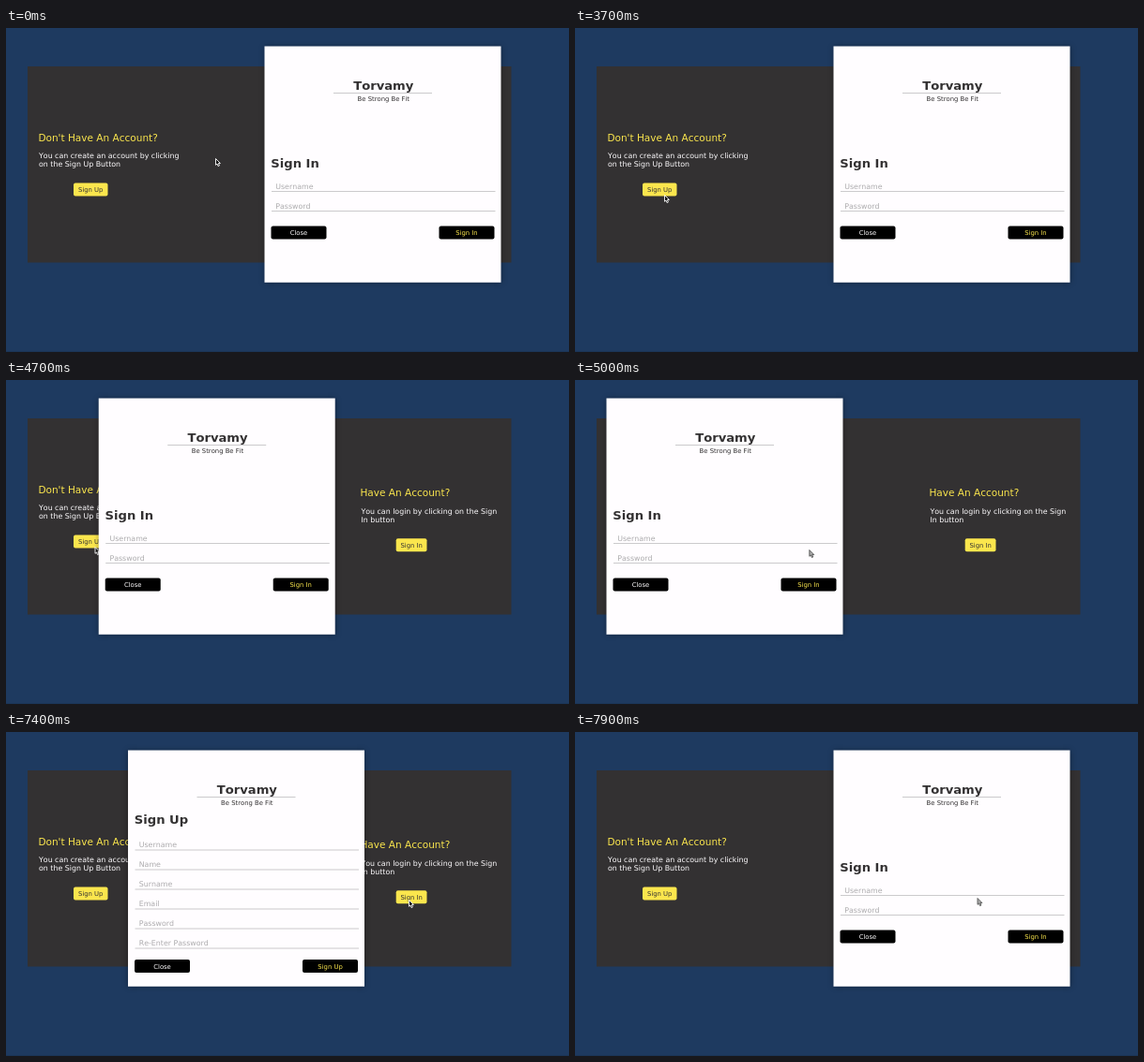
An HTML page with a canvas that plays this animation: 600 by 346 pixels, repeating every 8 s.

```html
<!DOCTYPE html>
<html lang="en">
<head>
<meta charset="utf-8">
<title>Sign in and sign up</title>
<style>
  html, body { margin: 0; width: 600px; height: 346px; overflow: hidden; background: #1e3a60; }
  canvas { display: block; }
</style>
</head>
<body>
<canvas id="stage" width="600" height="346"></canvas>
<script>
const ctx = document.getElementById('stage').getContext('2d');
const LOOP = 8000;
const NAVY = '#1e3a60', DARK = '#333132', YELLOW = '#fbe64d', WHITE = '#fffdff', GREY = '#acabad', LINE = '#cbcacc';
const TITLE = 'bold 13.15px', HEADING = '10.52px', BODY = '7.89px', SMALL = '6.84px';
const RIGHT_X = 275.5, LEFT_X = 33.5;

// Pointer stops: time, x, y
const pointerPath = [
  [0, 223, 139], [1850, 223, 139], [2100, 220, 146], [2400, 228, 154], [2600, 237, 156],
  [3000, 175, 168], [3400, 112, 176], [3700, 95, 178], [4000, 94, 178], [4700, 94, 178],
  [5000, 249, 181], [5400, 385, 183], [5800, 424, 178], [6100, 430, 183], [6500, 429, 179],
  [7400, 429, 179], [7900, 428.5, 177], [8000, 428.5, 177]
];

function rect(x, y, w, h, color, radius = 0) {
  ctx.fillStyle = color;
  ctx.beginPath();
  ctx.roundRect(x, y, w, h, radius);
  ctx.fill();
}

function text(str, x, y, size, color, align = 'left') {
  ctx.font = `${size} "DejaVu Sans", sans-serif`;
  ctx.fontKerning = 'none';
  ctx.textAlign = align;
  ctx.fillStyle = color;
  ctx.fillText(str, x, y);
}

function button(label, x, y, w, fill, color) {
  rect(x, y, w, 14, fill, 2);
  text(label, x + w / 2, y + 9.5, SMALL, color, 'center');
}

// Accelerate over the first fifth, decelerate over the last
function easeBoth(t) {
  if (t <= 0) return 0;
  if (t >= 1) return 1;
  if (t < 0.2) return 3.125 * t * t;
  if (t > 0.8) return 1 - 3.125 * (1 - t) ** 2;
  return 1.25 * t - 0.125;
}

function cardX(t) {
  const shift = easeBoth((t - 4070) / 922) - easeBoth((t - 7049) / 840);
  return RIGHT_X + (LEFT_X - RIGHT_X) * shift;
}

function drawBackdrop() {
  rect(0, 0, 600, 346, NAVY);
  rect(0, 345, 600, 1, '#1b3557');
  rect(23, 41, 515.5, 209.5, DARK);

  text("Don't Have An Account?", 34.4, 120.8, HEADING, YELLOW);
  text('You can create an account by clicking', 35, 138.8, BODY, WHITE);
  text('on the Sign Up Button', 35, 148, BODY, WHITE);
  button('Sign Up', 72, 165.5, 36.5, YELLOW, DARK);

  text('Have An Account?', 377.4, 124.3, HEADING, YELLOW);
  text('You can login by clicking on the Sign', 378.4, 142.6, BODY, WHITE);
  text('In button', 378.4, 151.6, BODY, WHITE);
  button('Sign In', 415.7, 169.3, 32.8, YELLOW, DARK);
}

function drawForm(title, titleY, fields, firstLine, buttonY) {
  text(title, 6.8, titleY, TITLE, DARK);
  fields.forEach((label, i) => {
    const y = firstLine + i * 21;
    text(label, 11.7, y - 2.6, BODY, GREY);
    rect(7.5, y - 0.5, 238.5, 1, LINE);
  });
  button('Close', 7, buttonY, 59, '#000', WHITE);
  button(title, 186, buttonY, 59, '#000', YELLOW);
}

function drawCard(x, signUp) {
  ctx.save();
  ctx.translate(x, 0);
  ctx.shadowColor = 'rgba(0,0,0,.35)';
  ctx.shadowBlur = 6;
  rect(0, 19.5, 252, 252.3, WHITE);
  ctx.shadowColor = 'transparent';
  text('Torvamy', 126.8, 65.6, TITLE, DARK, 'center');
  rect(73.5, 69, 105, 1, LINE);
  text('Be Strong Be Fit', 126.8, 78.2, SMALL, DARK, 'center');
  if (signUp) {
    drawForm('Sign Up', 98.2, ['Username', 'Name', 'Surname', 'Email', 'Password', 'Re-Enter Password'], 126, 243);
  } else {
    drawForm('Sign In', 148.6, ['Username', 'Password'], 174.6, 211.4);
  }
  ctx.restore();
}

function drawPointer(t, card) {
  const i = pointerPath.findIndex(p => p[0] > t);
  const [t0, x0, y0] = pointerPath[i - 1], [t1, x1, y1] = pointerPath[i];
  const k = (t - t0) / (t1 - t0);
  const x = x0 + (x1 - x0) * k, y = y0 + (y1 - y0) * k;
  const overCard = x > card && x < card + 252;
  ctx.save();
  ctx.translate(x, y);
  ctx.lineWidth = 0.9;
  ctx.strokeStyle = overCard ? '#555' : '#fff';
  ctx.fillStyle = overCard ? '#aaa' : '#111';
  const arrow = new Path2D('M.5 .5V7.3L2 6L3.1 8.6L4.4 8L3.4 5.5H5.4Z');
  ctx.fill(arrow);
  ctx.stroke(arrow);
  ctx.restore();
}

function draw(now) {
  const t = now % LOOP;
  const x = cardX(t);
  drawBackdrop();
  drawCard(x, t >= 5050 && t < 7892);
  drawPointer(t, x);
  requestAnimationFrame(draw);
}
draw(0);
</script>
</body>
</html>
```
